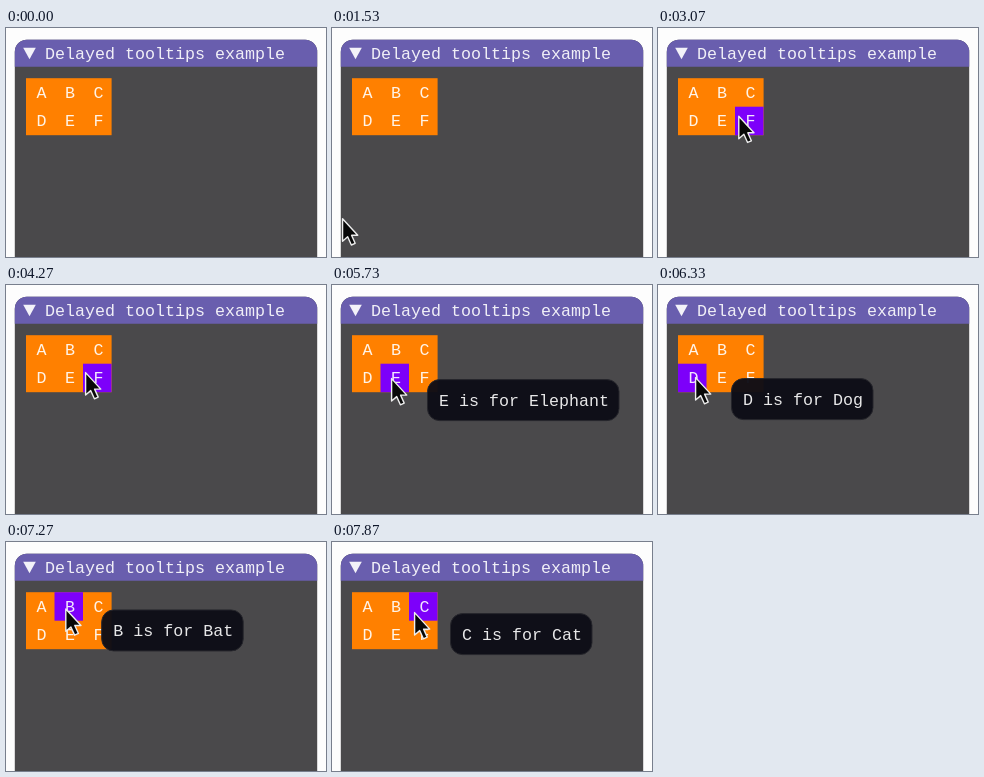
An HTML page that plays this animation: 320x229 px, repeating every 8000 ms.

```html
<!DOCTYPE html>
<html lang="en">
<head>
<meta charset="utf-8">
<title>Delayed tooltips example</title>
<style>
  html, body { margin: 0; width: 100%; height: 100%; overflow: hidden; background: #fdfdfd; }
  svg { display: block; width: 100%; height: 100%; }
  text { font: 16.667px "Liberation Mono", monospace; fill: #fff; fill-opacity: .9; white-space: pre; }
</style>
</head>
<body>
<svg viewBox="0 0 320 229">
  <path d="M8.8 229V24a12 12 0 0 1 12-12.3H299a12 12 0 0 1 12.2 12.3V229Z" fill="#4a494b"/>
  <path d="M8.8 38.7V24a12 12 0 0 1 12-12.3H299a12 12 0 0 1 12.2 12.3V38.7Z" fill="#695eae"/>
  <path d="M17.2 19.8H29.8L23.5 31.2Z" fill="#fff" fill-opacity=".92"/>
  <text x="39" y="31">Delayed tooltips example</text>
  <rect x="20" y="50.2" width="85.6" height="57" fill="#ff8000"/>
  <rect id="highlight" width="28.5" height="28.5" fill="#7d00fa"/>
  <g id="letters"></g>
  <g id="tip">
    <rect height="41" rx="12" fill="#0d0d16" fill-opacity=".96" stroke="#26262c"/>
    <text x="11.5" y="26.5"></text>
  </g>
  <path id="cursor" d="M-.4 .6V23L4.7 18.6L8.4 26.8L12.2 25.1L8.6 17.1H14.8Z"
        fill="#080808" stroke="#eee" stroke-width="1.4" stroke-linejoin="round"/>
</svg>
<script>
const LOOP = 8000, FPS = 15, TIP_DELAY_END = 4530;
const CELL = 28.5, LEFT = 20, TOP = 50.2, COLS = 3;
const WORDS = ["Apple", "Bat", "Cat", "Dog", "Elephant", "Fish"];

// Pointer path: time, x, y, and the easing used to reach the point
const linear = u => u;
const easeOut = u => u * (1.4 - 0.4 * u);
const smooth = u => u * u * (3 - 2 * u);
const PATH = [
  [1400, -18, 206, linear],
  [1467, -4, 199, linear],
  [2267, 127, 122, easeOut],
  [2333, 132, 117, linear],
  [2400, 132, 117, linear],
  [3133, 80, 87, smooth],
  [5333, 80, 87, linear],
  [5600, 77.5, 89, linear],
  [5667, 67, 92, linear],
  [5733, 60, 93, linear],
  [6133, 39, 92, smooth],
  [6267, 39, 92, linear],
  [6333, 38, 92, linear],
  [6800, 34, 64, smooth],
  [7133, 58, 66, linear],
  [7867, 83, 70, smooth]
];

const byId = id => document.getElementById(id);
const moveTo = (node, x, y) => node.setAttribute("transform", `translate(${x} ${y})`);
const show = (node, visible) => { node.style.display = visible ? "" : "none"; };
const cellOrigin = i => [LEFT + i % COLS * CELL, TOP + Math.floor(i / COLS) * CELL];

const highlight = byId("highlight"), tip = byId("tip"), cursor = byId("cursor");
const [tipBox, tipText] = tip.children;

WORDS.forEach((word, i) => {
  const letter = document.createElementNS("http://www.w3.org/2000/svg", "text");
  const [x, y] = cellOrigin(i);
  letter.textContent = word[0];
  moveTo(letter, x + 10.4, y + 19.5);
  byId("letters").append(letter);
});

function pointerAt(t) {
  const next = PATH.findIndex(key => key[0] > t);
  if (next === 0) return null;
  if (next < 0) return PATH[PATH.length - 1].slice(1, 3);
  const [t0, x0, y0] = PATH[next - 1], [t1, x1, y1, ease] = PATH[next];
  const u = ease((t - t0) / (t1 - t0));
  return [x0 + (x1 - x0) * u, y0 + (y1 - y0) * u];
}

function cellAt([x, y]) {
  const col = Math.floor((x - LEFT) / CELL), row = Math.floor((y - TOP) / CELL);
  return col >= 0 && col < COLS && row >= 0 && row < 2 ? row * COLS + col : -1;
}

function render(time) {
  // The pointer is sampled at a fixed rate
  const t = Math.floor((time + 4) * FPS / 1000) * 1000 / FPS + 0.5;
  const pos = pointerAt(t);
  const hovered = pos ? cellAt(pos) : -1;

  show(cursor, pos);
  if (pos) moveTo(cursor, ...pos);

  show(highlight, hovered >= 0);
  if (hovered >= 0) moveTo(highlight, ...cellOrigin(hovered));

  const tipVisible = hovered >= 0 && time >= TIP_DELAY_END;
  show(tip, tipVisible);
  if (tipVisible) {
    const word = WORDS[hovered], label = `${word[0]} is for ${word}`;
    tipText.textContent = label;
    tipBox.setAttribute("width", label.length * 10 + 21.5);
    moveTo(tip, pos[0] + 35.5, pos[1] + 1.6);
  }
}

const start = performance.now();
function tick() {
  render((performance.now() - start) % LOOP);
  requestAnimationFrame(tick);
}
tick();
</script>
</body>
</html>
```
